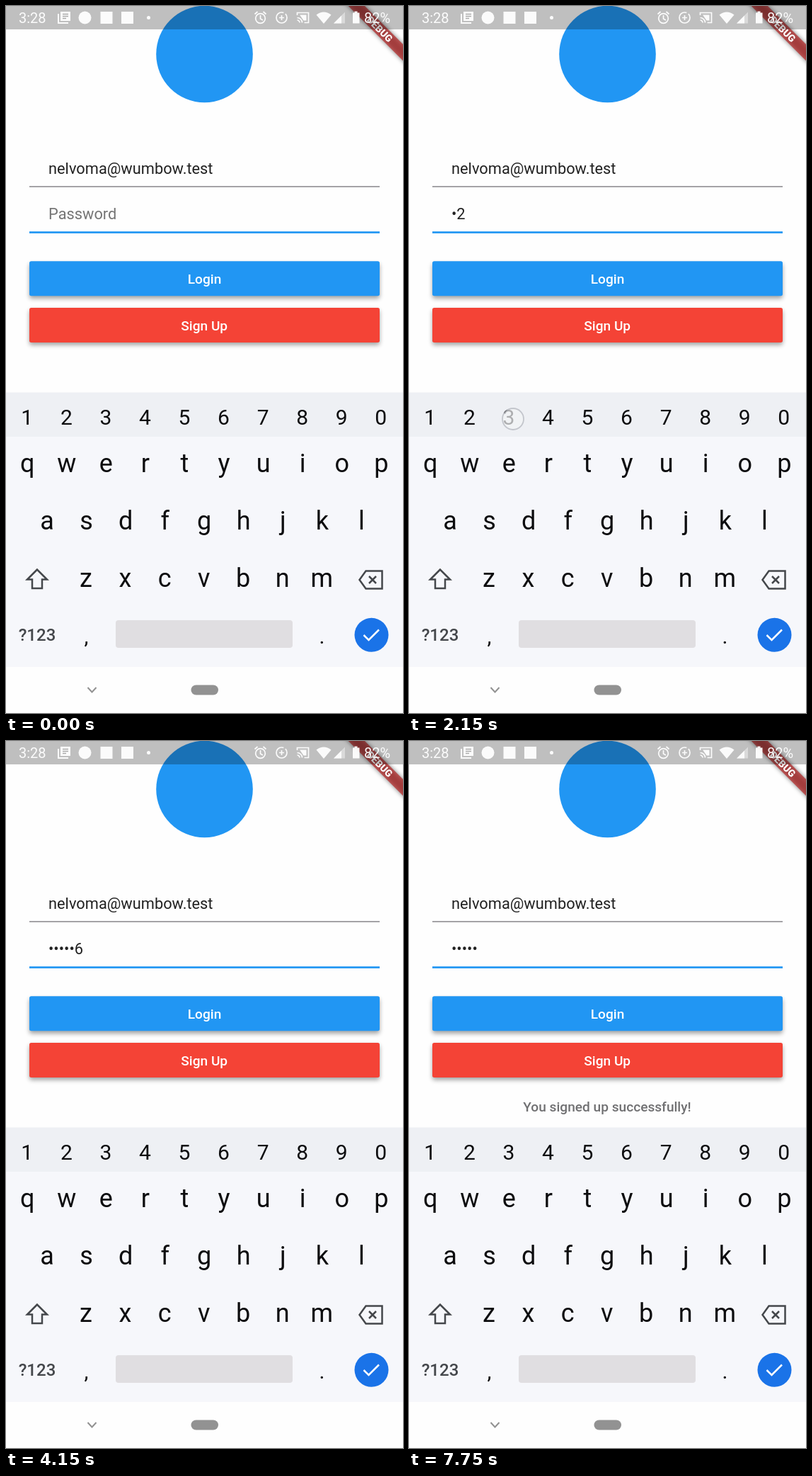
Animation of 561 by 998 pixels, one loop 8 s. Source, as an HTML page:

```html
<!DOCTYPE html>
<html lang="en">
<head>
<meta charset="utf-8">
<title>Sign up form</title>
<style>
  html, body { margin: 0; width: 100%; height: 100%; overflow: hidden; background: #fefefe; }
  svg { display: block; width: 100%; height: 100%; font-family: Roboto, sans-serif; }
  .mid { text-anchor: middle; }
  .field { font-size: 21.82px; fill: #212121; }
  .label { font-size: 19.1px; font-weight: 500; }
  .line { fill: none; stroke-linecap: butt; }
</style>
</head>
<body>
<svg viewBox="0 0 561 998">
  <defs>
    <filter id="blur" x="-20%" y="-80%" width="140%" height="260%"><feGaussianBlur stdDeviation="3"/></filter>
    <clipPath id="signUpClip"><rect x="33" y="426" width="495" height="49" rx="2.7"/></clipPath>
  </defs>
  <rect width="561" height="998" fill="#fefefe"/>
  <circle cx="280.5" cy="68" r="68.3" fill="#2196f3"/>

  <!-- form -->
  <text class="field" x="60" y="236.5">nelvoma@wumbow.test</text>
  <rect x="33" y="254.2" width="495" height="1.5" fill="#88868a"/>
  <text class="field" id="hint" x="60" y="300.7" style="fill:#757575">Password</text>
  <text class="field" id="password" x="60" y="300.7"></text>
  <rect id="cursor" y="282.5" width="2.6" height="21" fill="#4285f4"/>
  <rect x="33" y="318.2" width="495" height="2.7" fill="#2196f3"/>
  <g filter="url(#blur)" opacity=".36">
    <rect x="33" y="364" width="495" height="49" rx="3"/>
    <rect x="33" y="429.5" width="495" height="49" rx="3"/>
  </g>
  <rect x="33" y="360.3" width="495" height="49" rx="2.7" fill="#2196f3"/>
  <rect x="33" y="426" width="495" height="49" rx="2.7" fill="#f44336"/>
  <circle id="ripple" cx="300" cy="452" clip-path="url(#signUpClip)" fill="#fff"/>
  <g class="mid label" fill="#fff">
    <text x="280.5" y="391.8">Login</text>
    <text x="280.2" y="457.6">Sign Up</text>
  </g>
  <text class="mid label" id="message" x="280" y="523" fill="#707072">You signed up successfully!</text>

  <!-- debug ribbon -->
  <g transform="translate(561 0) rotate(45)">
    <rect x="-70" y="38.2" width="140" height="16.4" filter="url(#blur)" opacity=".5"/>
    <rect x="-70" y="38.2" width="140" height="16.4" fill="#b71c1c" opacity=".66"/>
    <text class="mid" y="51.3" font-size="13.9" font-weight="900" fill="#fff">DEBUG</text>
  </g>

  <!-- status bar -->
  <rect width="561" height="33" opacity=".25"/>
  <g fill="#fff" opacity=".94">
    <text x="18" y="23.6" font-size="20">3:28</text>
    <path d="M77 8h14v13h-14z"/>
    <path class="line" d="M74 11v13h14" stroke="#fff" stroke-width="2"/>
    <path class="line" d="M80 11.5h8M80 14.5h8M80 17.5h5" stroke="#aaa" stroke-width="1.5"/>
    <circle cx="111.500" cy="16.500" r="9"/>
    <rect x="133.500" y="8" width="17" height="17"/>
    <rect x="163" y="8" width="17" height="17"/>
    <circle cx="201.500" cy="16.500" r="2.500"/>
    <g class="line" stroke="#fff" stroke-width="1.7">
      <circle cx="359.500" cy="17.500" r="6.800"/>
      <path d="M359.500 13v5l3.500 2M351.500 11.500l4-3.500M367.500 11.500l-4-3.500"/>
      <circle cx="389.500" cy="16.500" r="7.500" stroke-dasharray="38 3"/>
      <path d="M389.500 13v7M386 16.500h7"/>
      <path d="M411.500 13v-3.500h16v14h-6M411.500 16.500a7 7 0 0 1 7 7M411.500 20a3.500 3.500 0 0 1 3.500 3.500"/>
    </g>
    <path d="M415 12.500h9.500v8h-4z"/>
    <path d="M449 25L438.500 12.500Q449 4.500 459.500 12.500Z"/>
    <path d="M463 24.500L479 8.500V24.500Z" opacity=".45"/>
    <path d="M463 24.500L474 13.500V24.500Z"/>
    <path d="M490 9.500h2.500v-2h4v2h3v15h-9.500z"/>
    <text x="506" y="23.600" font-size="20">82%</text>
  </g>

  <!-- keyboard -->
  <rect y="545.500" width="561" height="63" fill="#eef0f4"/>
  <rect y="608" width="561" height="325" fill="#f6f7fb"/>
  <g id="keys" class="mid" fill="#0c0c0e"></g>
  <text class="mid" x="44" y="896" font-size="24" font-weight="500" fill="#44474b">?123</text>
  <rect x="155" y="867" width="250" height="39" rx="4" fill="#e0dee1"/>
  <circle cx="516.500" cy="887.800" r="24" fill="#1a73e8"/>
  <g class="line" stroke="#44474b" stroke-width="2.500">
    <path d="M44 795.500L30 809.500h7v12.500h14v-12.500h7z"/>
    <path d="M508.500 797.500h23v25h-23l-9-12.500zM513 805l10 10M523 805l-10 10"/>
    <path d="M505.500 888l7 7 14.500-14.500" stroke="#fff"/>
    <path d="M115.500 962l6 6.500 6-6.500" stroke="#929292" stroke-width="2"/>
  </g>
  <rect x="261.500" y="958.500" width="38.500" height="14" rx="7" fill="#929292"/>
  <circle id="touch" r="15" fill="#f2f3f5" fill-opacity=".7" stroke="#a5a9b0" stroke-opacity=".6" stroke-width="1.800"/>
</svg>
<script>
  const LOOP = 8000, BLINK = 500, BLINK_START = 250;
  const MASK_TICKS = 3, PRESS_SIGN_UP = 5400, SHOW_MESSAGE = 5750;
  const $ = id => document.getElementById(id);

  const digitTaps = [
    { down: 450, up: 700, x: 32, y: 583 },
    { down: 1300, up: 1500, x: 88, y: 583 },
    { down: 2050, up: 2250, x: 147, y: 583 },
    { down: 2550, up: 2800, x: 210, y: 583 },
    { down: 3150, up: 3350, x: 262, y: 583 },
    { down: 3850, up: 4050, x: 312, y: 583 }
  ];
  const erase = { down: 7300, up: 7480, x: 530, y: 812 };
  const taps = [...digitTaps, { down: PRESS_SIGN_UP, up: 5580, x: 300, y: 452 }, erase];

  const rows = [
    ['1234567890', 29.8, 590.5, 30],
    ['qwertyuiop', 30.3, 658, 36],
    ['asdfghjkl', 58, 739, 36],
    ['zxcvbnm', 113, 819.5, 36],
    [',', 113.5, 900, 30],
    ['.', 446.5, 900, 30]
  ];
  $('keys').innerHTML = rows.map(([chars, x, y, size]) =>
    [...chars].map((c, i) =>
      `<text x="${x + 55.55 * i}" y="${y}" font-size="${size}">${c}</text>`).join('')
  ).join('');

  const show = (el, on) => el.setAttribute('visibility', on ? 'visible' : 'hidden');
  const blinkTick = t => Math.floor((t - BLINK_START) / BLINK);

  function passwordAt(t) {
    if (t >= erase.up) return '•'.repeat(digitTaps.length - 1);
    const typed = digitTaps.filter(tap => t >= tap.up);
    if (!typed.length) return '';
    const age = blinkTick(t) - blinkTick(typed[typed.length - 1].up);
    return '•'.repeat(typed.length - 1) + (age < MASK_TICKS ? typed.length : '•');
  }

  function render(t) {
    const value = passwordAt(t);
    $('password').textContent = value;
    show($('hint'), !value);
    $('cursor').setAttribute('x', 60 + (value ? $('password').getComputedTextLength() : 0));
    show($('cursor'), blinkTick(t) % 2 === 0);
    show($('message'), t >= SHOW_MESSAGE);

    const tap = taps.find(p => t >= p.down && t < p.up + 50);
    show($('touch'), tap);
    if (tap) {
      $('touch').setAttribute('cx', tap.x);
      $('touch').setAttribute('cy', tap.y);
      $('touch').setAttribute('opacity', t < tap.up ? 1 : 1 - (t - tap.up) / 50);
    }

    const spread = (t - PRESS_SIGN_UP) / 400;
    const active = spread > 0 && spread < 1;
    show($('ripple'), active);
    if (active) {
      $('ripple').setAttribute('r', 15 + 180 * spread);
      $('ripple').setAttribute('opacity', 0.2 * Math.min(1, 2 - 2 * spread));
    }
  }

  const start = performance.now();
  function frame() {
    render((performance.now() - start) % LOOP);
    requestAnimationFrame(frame);
  }
  frame();
</script>
</body>
</html>
```
